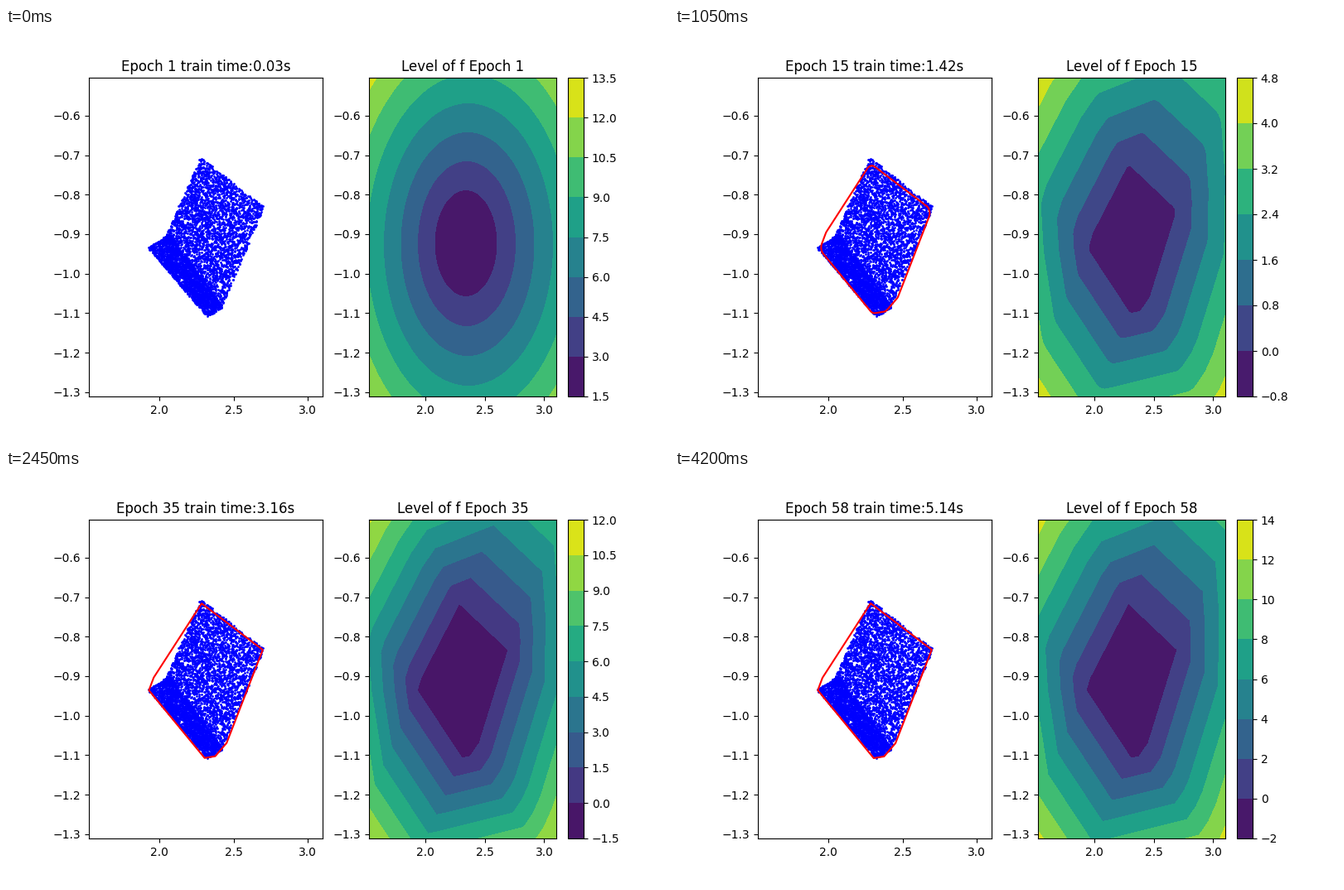
Animation, 800 px wide and 500 px high, one loop 4550 ms. Source, as a matplotlib script:

```python
import numpy as np
import matplotlib.pyplot as plt
from matplotlib.animation import FuncAnimation

X0, X1, Y0, Y1 = 1.525, 3.0995, -1.3107, -0.504
LEFT, RIGHT = (100, 281.82), (438.18, 225.45)  # panel start and width in pixels
COUNT = 13

# Training history at a few epochs
EPOCHS = [1, 5, 10, 20, 25, 30, 35, 40, 50, 58]
SECONDS = [0.03, 0.46, 0.95, 1.89, 2.27, 2.72, 3.16, 3.59, 4.44, 5.14]
HIGHEST = [12.6, 0.107, 1.29, 7.8, 9.7, 10.6, 10.75, 12.05, 12.1, 12.8]

# Final shape: a polygon, and the polygon it grows by with each ring
CENTER = np.array([548, 262])
CORNERS = np.array([(547, 161), (606, 217), (571, 330), (560, 346),
                    (550, 348), (496, 266), (500.5, 251)])
GROWTH = np.array([(31, -71), (34, -28), (33, 29), (29, 38),
                   (-23, 51), (-31, 0), (-33, -34), (-22, -50)])

# Outward normals; every convex ring is traced by its point furthest along each
angles = np.radians(202 + np.linspace(0, 360, 361))
NORMALS = np.column_stack([np.cos(angles), np.sin(angles)])


def to_data(p, panel):
    """Stage pixels to data coordinates of one panel."""
    x = X0 + (p[..., 0] - panel[0]) / panel[1] * (X1 - X0)
    y = Y1 - (p[..., 1] - 60) / 385 * (Y1 - Y0)
    return x, y


def trace_polygon(points):
    return points[np.argmax(NORMALS @ points.T, axis=1)]


def trace_ellipse(center, radii):
    reach = np.linalg.norm(NORMALS * radii, axis=1, keepdims=True)
    return center + NORMALS * np.square(radii) / reach


INNER, OUTWARD = trace_polygon(CORNERS), trace_polygon(GROWTH)


def ring(k, sharp):
    """Ring k, from an ellipse (sharp 0) to the grown polygon (sharp 1)."""
    oval = trace_ellipse((555 + 2 * k, 260 + k), (38 + 43 * k, 64.5 + 71 * k))
    return (1 - sharp) * oval + sharp * (INNER + k * OUTWARD)


def field(epoch):
    """Curved grid of points and the value of f on it."""
    high = np.interp(epoch, EPOCHS, HIGHEST)
    base = np.interp(epoch, [1, 5, 10], [3, -0.069, 0])
    slope = (high - base) / 3.2
    low = base - 0.35 * slope
    sharp = 1 - np.exp(-(epoch - 1) / 7.5)
    ks = np.linspace(0, 5, 51)
    core = np.broadcast_to(CENTER, NORMALS.shape)
    x, y = to_data(np.array([core] + [ring(k, sharp) for k in ks]), RIGHT)
    z = np.clip(np.append(low, base + slope * ks), low, high)
    return x, y, np.repeat(z[:, None], len(NORMALS), axis=1)


def quad(rng, n, a, b, c, d, bias=1.0):
    """Random points in a quadrilateral, drawn towards side a-d by the bias."""
    u, v = rng.random((n, 1)), rng.random((n, 1)) ** bias
    a, b, c, d = map(np.array, (a, b, c, d))
    return (1 - v) * ((1 - u) * a + u * d) + v * ((1 - u) * b + u * c)


rng = np.random.default_rng(4)
dots = np.vstack([
    quad(rng, 3000, (234.5, 156), (311.5, 216), (260, 338), (192, 253)),
    quad(rng, 2000, (171, 265), (197, 248), (262, 337), (243, 349), 1.1),
])

fig, (left, right) = plt.subplots(1, 2, figsize=(8, 5), dpi=100)
right.set_position([RIGHT[0] / 800, 0.11, RIGHT[1] / 800, 0.77])
for ax in (left, right):
    ax.set(xlim=(X0, X1), ylim=(Y0, Y1), xticks=[2, 2.5, 3],
           yticks=np.arange(-13, -5) / 10)
left.scatter(*to_data(dots, LEFT), s=1, c="blue")

drawn = []


def update(i):
    epoch = min(max(1, 5 * i), 58)
    seconds = np.interp(epoch, EPOCHS, SECONDS)
    while drawn:
        drawn.pop().remove()
    x, y, z = field(epoch)
    fill = right.contourf(x, y, z, cmap="viridis")
    cax = fig.add_axes([677.7 / 800, 0.11, 19.25 / 800, 0.77])
    fig.colorbar(fill, cax=cax, ticks=fill.levels)
    drawn.extend([fill, cax])
    if z.min() < 0:
        drawn.append(left.contour(x, y, z, levels=[0], colors="red"))
    left.set_title(f"Epoch {epoch} train time:{seconds:.2f}s")
    right.set_title(f"Level of f Epoch {epoch}")
    return drawn


anim = FuncAnimation(fig, update, frames=COUNT, interval=350,
                     repeat=True, repeat_delay=0, blit=False)
plt.show()
```
